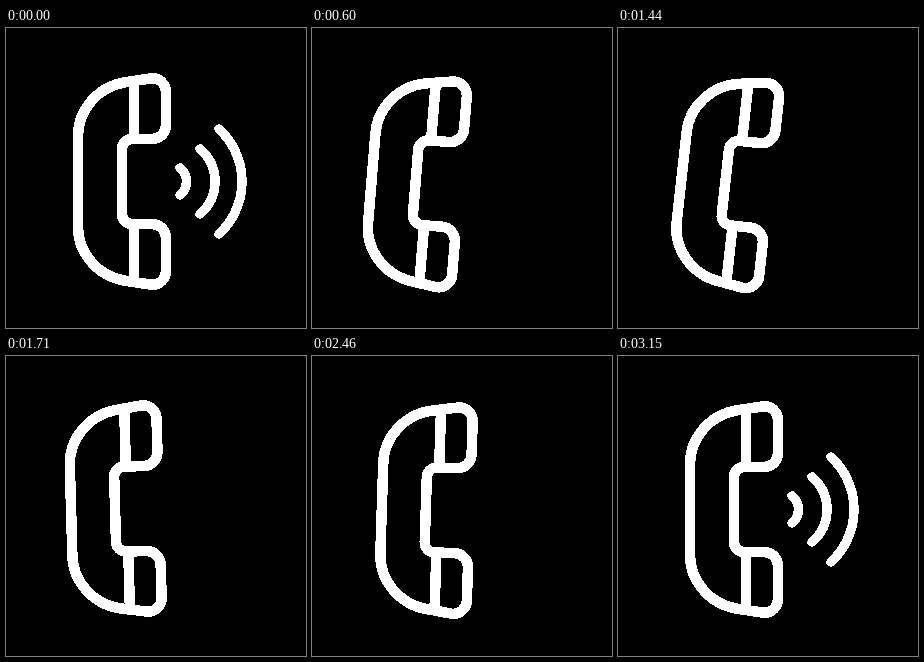
These frames come from a looping animation (300x300 px, 3.48 s). An HTML page:

```html
<!DOCTYPE html>
<html lang="en">
<head>
<meta charset="utf-8">
<title>Ringing phone</title>
<style>
  html, body { margin: 0; width: 100%; height: 100%; overflow: hidden; background: #000; }
  svg { display: block; width: 100%; height: 100%; shape-rendering: crispEdges; }
  path { fill: none; stroke: #fff; stroke-width: 10.5; stroke-linecap: round; stroke-linejoin: round; }
  .wave { stroke-width: 9.5; }
</style>
</head>
<body>
<svg viewBox="0 0 300 300">
  <g id="phone">
    <path d="M72 108 C72 82 92 59 118 54.5 L144 50.5 C153 49 160 56 160 64 V97 A14 14 0 0 1 146 111
             H126 A10 10 0 0 0 116 121 V186 A10 10 0 0 0 126 196 H146 A14 14 0 0 1 160 210 V243
             C160 251 153 258 144 256.5 L118 252.5 C92 248 72 225 72 199 Z"/>
    <path style="stroke-linecap:butt" d="M128 54 V111 M128 196 V253"/>
  </g>
  <g id="waves">
    <path class="wave" pathLength="100" d="M174 140 A17.3 17.3 0 0 1 174 167"/>
    <path class="wave" pathLength="100" d="M194 121 A42.7 42.7 0 0 1 194 186"/>
    <path class="wave" pathLength="100" d="M213 101 A71.4 71.4 0 0 1 213 206"/>
  </g>
</svg>
<script>
const LOOP = 3480, STEP = 30;
const phone = document.getElementById('phone');
const waves = document.getElementById('waves');

const linear = t => t;
const smooth = t => (1 - Math.cos(Math.PI * t)) / 2;
const clamp = t => Math.min(1, Math.max(0, t));

// Interpolates [time, value] keys.
function track(keys, time, ease) {
  const next = keys.findIndex(key => key[0] > time);
  if (next < 0) return keys[keys.length - 1][1];
  const [t0, v0] = keys[next - 1], [t1, v1] = keys[next];
  return v0 + (v1 - v0) * ease((time - t0) / (t1 - t0));
}

const swing = [[0, 0], [440, 9.5], [910, -9], [1370, 6.9], [1850, -3.7], [2270, 3], [2720, 0]];
const recoil = [[0, 0], [440, -12.5], [900, -12]];
const settle = [[900, -12], [2460, -2.2], [3000, 0]];

// Waves slide out while shrinking to their midpoints, then emerge again.
function waveState(time) {
  if (time < 570) {
    const p = smooth(clamp(time / 555));
    return { shift: 42 * p, length: 100 * (1 - p) };
  }
  const rest = (1 - clamp((time - 2520) / 600)) ** 2;
  return { shift: -42 * rest, length: 100 * (1 - rest) };
}

function draw(time) {
  const angle = track(swing, time, smooth);
  const x = time < 900 ? track(recoil, time, smooth) : track(settle, time, linear);
  phone.setAttribute('transform', `translate(${x} 0) rotate(${angle} 111 153.5)`);

  const { shift, length } = waveState(time);
  waves.setAttribute('transform', `translate(${shift} 0)`);
  waves.setAttribute('visibility', length > 0 ? 'visible' : 'hidden');
  for (const wave of waves.children) {
    wave.setAttribute('stroke-dasharray', length >= 100 ? 'none' : `${length} 200`);
    wave.setAttribute('stroke-dashoffset', length >= 100 ? 0 : length / 2 - 50);
  }
}

const start = performance.now();
function tick() {
  const time = (performance.now() - start) % LOOP;
  draw(Math.floor(time / STEP) * STEP);
  requestAnimationFrame(tick);
}
tick();
</script>
</body>
</html>
```
